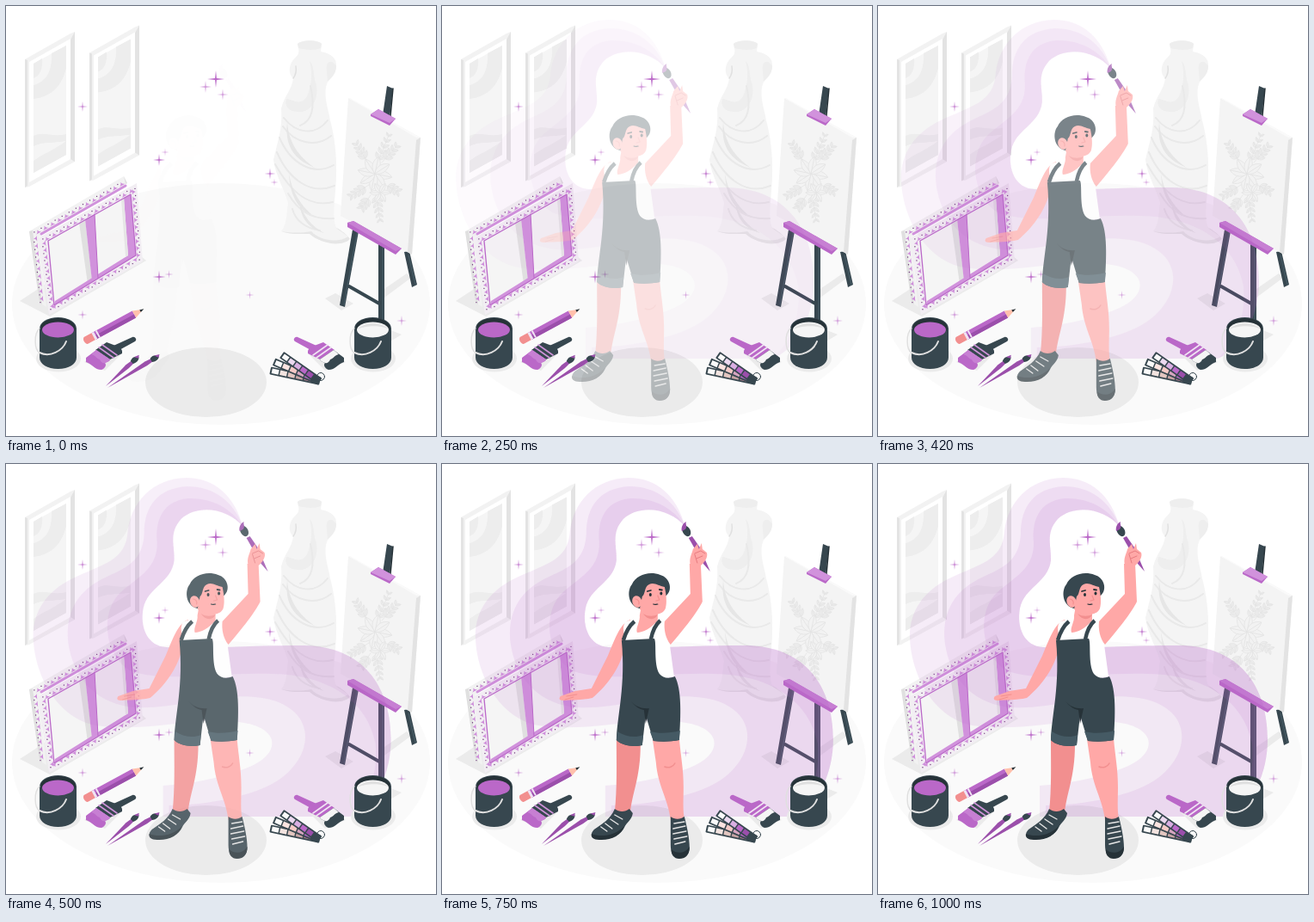
These frames come from a looping animation (500 px wide and 500 px high, 1.04 s). An HTML page:

```html
<!DOCTYPE html>
<html lang="en">
<head>
<meta charset="utf-8">
<title>Painter in the studio</title>
<style>
html, body { margin: 0; width: 100%; height: 100%; overflow: hidden; background: #fff; }
svg { display: block; width: 100%; height: 100%; }
</style>
</head>
<body>
<svg viewBox="0 0 500 500" fill="none" stroke-linecap="round" stroke-linejoin="round">
  <ellipse cx="250" cy="346.500" rx="243" ry="140.500" fill="#fafafa"/>
  <ellipse cx="232.500" cy="437.500" rx="70.500" ry="40.500" fill="#ebebeb"/>

  <defs>
    <g id="picture">
      <path d="M22 62L75 32L80 30V181L27 210L22 211Z" fill="#f2f2f2"/>
      <path d="M22 62L25 63V209L22 211ZM75 39L80 30V181L75 178Z" fill="#e3e3e3"/>
      <path d="M27 65L75 38V178L27 205Z" fill="#fff"/>
      <path d="M32 67L70 46V173L32 194Z" fill="#f5f5f5"/>
      <path d="M53 55L70 46V72C64 98 48 106 32 108V92C46 88 54 77 53 55ZM32 67L42 61C43 72 40 81 32 84ZM32 151C43 145 54 153 70 149V173L32 194V180C43 172 55 168 70 157C55 160 44 157 32 163Z" fill="#ededed"/>
    </g>
    <g id="can">
      <ellipse cx="61" cy="410" rx="26" ry="15.500" fill="#ebebeb"/>
      <path d="M39 375V409C39 416 48 422 60.500 422S82 416 82 409V375Z" fill="#37474f"/>
      <ellipse cx="60.500" cy="375" rx="21.500" ry="13" fill="#37474f"/>
      <ellipse cx="60.500" cy="374" rx="20" ry="11" fill="#263238"/>
      <path d="M39 375C32 381 33 400 39 403" stroke="#e0e0e0" stroke-width="1.500"/>
      <path d="M39 403C51 409 66 401 70 390" stroke="#e0e0e0" stroke-width="2"/>
    </g>
  </defs>
  <use href="#picture"/>
  <use href="#picture" x="75" y="-7.500"/>

  <!-- ornate frames -->
  <path d="M16 343L45 324L151 286L163 296L51 361Z" fill="#ebebeb"/>
  <path d="M27 262L137 198L141 206L38 269L47 350L39 345Z" fill="#f2f2f2"/>
  <path d="M27 262L31 261L42 347L39 345ZM137 198L141 206L139 207Z" fill="#e0e0e0"/>
  <path d="M41 265L139 209" stroke="#d192dc" stroke-width="3"/>
  <path d="M37 270L152 206L159 297L50 359Z" fill="#f2eef3"/>
  <path d="M49 273L145 219L151 290L56 348Z" fill="#f5f5f5"/>
  <path d="M85 252L92 248L100 320L95 323Z" fill="#e0e0e0"/>
  <path d="M92 248L103 242L107 316L100 320Z" fill="#d192dc"/>
  <path d="M137 223L145 219L151 290L56 348L57 343L142 290Z" fill="#d192dc"/>
  <path d="M134 225L137 223L142 290L139 292Z" fill="#e6e6e6"/>
  <path d="M49 273L145 219L151 290L56 348Z" stroke="#ba68c8" stroke-width="1.300"/>
  <path d="M103 242L107 316" stroke="#ba68c8"/>
  <g id="trim"></g>

  <!-- statue -->
  <path d="M320 262C335 254 347 245 358 248C378 251 397 265 400 271C390 281 365 276 353 265C340 265 330 266 320 262Z" fill="#e6e6e6"/>
  <path d="M339 44C345 39 362 39 367 44L366 53C378 55 385 61 384 70C383 79 377 85 374 88C368 102 374 116 377 133C383 155 386 184 383 214C382 232 379 250 385 259L398 268C386 276 365 273 355 262C343 264 333 264 320 262C327 254 326 240 328 229C323 211 314 199 311 179C315 160 322 143 320 119C324 104 333 96 334 84C328 79 329 70 333 64C338 57 343 58 339 44Z" fill="#f4f4f4"/>
  <path d="M339 44C345 39 362 39 367 44L366 49C358 52 348 51 340 49ZM374 88C377 84 384 80 384 70C380 62 371 63 373 75ZM353 64C357 78 355 95 350 105C343 118 330 107 326 108C323 119 332 124 344 123C357 121 365 105 360 89C357 80 359 70 353 64Z" fill="#eee"/>
  <path d="M323 130C337 148 359 152 374 133M322 140C336 160 361 165 378 151M318 153C331 184 358 198 381 185M315 170C328 200 353 221 382 209M313 184C330 215 351 235 380 228M328 218C339 237 354 249 381 247M333 236C337 250 347 258 365 261M354 93C360 119 355 134 342 139" stroke="#e9e9e9" stroke-width="2"/>
  <path d="M327 135C329 164 346 179 359 188C341 181 323 168 327 135ZM329 195C332 215 343 232 356 243C339 237 330 219 329 195ZM341 226C345 244 355 256 370 264C352 259 342 247 341 226Z" fill="#e6e6e6"/>
  <path d="M334 84C337 80 338 76 337 70" stroke="#e0e0e0" stroke-width="1.500"/>

  <!-- easel -->
  <path d="M371 340L383 334L404 346L390 354ZM425 384L440 374L460 382L442 393ZM434 333L466 311L471 316L436 342Z" fill="#ebebeb"/>
  <path d="M443 93L450 96L446 131L438 127Z" fill="#37474f"/>
  <path d="M450 96L447 128" stroke="#263238" stroke-width="1.500"/>
  <path d="M463 286L469 285L478 324L472 327ZM433 277H440V366H433ZM403 260L410 262L394 350L388 348Z" fill="#37474f"/>
  <path d="M468 290L476 324M438 280V366M408 264L393 347" stroke="#455a64" stroke-width="1.200"/>
  <path d="M399 326L434 346" stroke="#37474f" stroke-width="4"/>
  <path d="M398 107L482 153L472 289L389 244Z" fill="#f4f4f4"/>
  <path d="M482 153L477 156L467 286L472 289Z" fill="#e3e3e3"/>
  <path d="M398 107L477 153L482 153L400 107Z" fill="#fafafa"/>
  <g id="sketch" stroke="#e4e4e4" stroke-width=".8"></g>
  <path d="M424 126L433 120L453 131L446 139L424 128Z" fill="#ba68c8"/>
  <path d="M424 126L433 120L453 131L446 136Z" fill="#d192dc"/>
  <path d="M397 252L404 250L460 282L453 289L397 257Z" fill="#ba68c8"/>
  <path d="M397 252L404 250L460 282L453 285Z" fill="#c77fd3"/>

  <g id="sparkles" fill="#ba68c8"></g>

  <!-- painter -->
  <g id="painter">
    <g id="ribbon" fill="#ba68c8" fill-opacity=".125"></g>

    <path d="M201 321C201 350 202 376 199 405L217 406C219 383 229 365 229 326Z" fill="#f28f8f"/>
    <path d="M243 320L274 319C276 342 279 354 279 376C279 389 278 401 280 413L264 414C261 389 249 374 247 347Z" fill="#ffa8a7"/>
    <path d="M257 352C262 354 267 352 269 348" stroke="#f28f8f" stroke-width="1.500"/>

    <path d="M199 401C204 405 211 405 216 401L220 406C219 414 213 416 210 423C206 431 195 437 181 436C171 436 170 430 175 425C185 418 194 413 199 401Z" fill="#37474f"/>
    <path d="M172 430C181 434 200 433 210 421C207 432 194 438 181 437C174 437 171 434 172 430Z" fill="#263238"/>
    <path d="M199 408L208 413M194 413L203 419M188 418L196 424M183 422L190 427" stroke="#e6e6e6" stroke-width="1.400"/>
    <path d="M264 410C269 414 276 413 280 410C283 422 286 435 286 446C286 455 280 459 274 458C267 458 264 452 264 443Z" fill="#37474f"/>
    <path d="M265 448C271 454 281 453 286 445C286 455 281 459 274 459C268 459 264 454 265 448Z" fill="#263238"/>
    <path d="M268 418L280 416M267 424L281 421M267 430L282 427M268 436L283 433M269 442L281 439" stroke="#e6e6e6" stroke-width="1.400"/>

    <path d="M217 181C205 185 198 207 191 223L172 261L153 264L136 270C134 272 134 275 139 275C148 274 160 275 173 272C188 260 204 239 209 219L222 190Z" fill="#ffa8a7"/>
    <path d="M143 270L155 268M141 274L151 271" stroke="#f28f8f"/>
    <path d="M211 184C216 181 223 181 227 181L251 181C259 184 260 201 263 210L268 247L249 251L208 208C213 198 206 193 211 184Z" fill="#fff"/>
    <path d="M257 183L287 151L286 116L299 115L301 160C296 171 279 193 264 210C258 203 256 192 257 183Z" fill="#ffa8a7"/>
    <path d="M230 165L249 173V182C241 191 232 196 225 196C223 190 229 183 228 176Z" fill="#ffa8a7"/>
    <path d="M232 174C238 178 245 177 249 175C247 181 238 183 232 174Z" fill="#f28f8f"/>

    <path d="M207 205L245 203C248 207 244 233 251 244C255 249 262 250 269 247C277 262 276 292 274 321C264 323 253 323 244 322L235 292L231 327C221 329 208 328 201 321C202 291 212 258 207 205Z" fill="#37474f"/>
    <path d="M202 311C211 317 223 319 232 315L231 327C221 329 208 328 201 321ZM240 311C251 314 264 313 275 310L274 321C264 323 253 323 244 322Z" fill="#455a64"/>
    <path d="M218 276C223 282 231 285 239 284L235 302L233 286C227 285 222 281 218 276Z" fill="#263238"/>
    <path d="M209 205C212 195 216 188 222 183M241 204C243 194 246 187 252 182" stroke="#37474f" stroke-width="4.500" stroke-linecap="butt"/>

    <path d="M228 168C214 165 213 147 219 140C224 129 239 124 252 129C263 132 267 146 259 153L234 168Z" fill="#37474f"/>
    <path d="M231 154C235 151 233 143 239 140C245 137 250 142 257 143C259 152 260 161 258 168C254 177 241 176 234 172L228 169Z" fill="#ffa8a7"/>
    <ellipse cx="225" cy="160" rx="5.500" ry="7" transform="rotate(-20 225 160)" fill="#ffa8a7"/>
    <path d="M223 157C226 157 228 160 227 163M249 153L251 158L247 159" stroke="#f28f8f" stroke-width="1.200"/>
    <path d="M237 148L241 147M251 146L254 146.500" stroke="#263238" stroke-width="1.800"/>
    <path d="M244 163C246 164 248 163 249 163" stroke="#263238" stroke-width="1.200"/>
    <ellipse cx="240.500" cy="152" rx="1.500" ry="2" fill="#263238"/>
    <ellipse cx="253" cy="150.500" rx="1.500" ry="2" fill="#263238"/>

    <path d="M285 86L289 84L298 97L310 125L302 116Z" fill="#9b4fab"/>
    <ellipse cx="282.500" cy="78" rx="4.500" ry="6.500" transform="rotate(-28 282.500 78)" fill="#37474f"/>
    <path d="M277 78C276 74 278 69 282 67C281 71 284 72 281 76Z" fill="#9b4fab"/>
    <path d="M287 117C285 110 289 104 290 99L295 93L297 99L300 92L301 99L306 103C308 108 303 115 299 118Z" fill="#ffa8a7"/>
    <path d="M292 104L299 101L304 104M294 110L301 107M292 105L295 115" stroke="#e77c80"/>
  </g>

  <!-- tools on the floor -->
  <use href="#can"/>
  <ellipse cx="60.500" cy="376.500" rx="18.500" ry="9" fill="#ba68c8"/>
  <use href="#can" x="366"/>
  <ellipse cx="426.500" cy="376.500" rx="18.500" ry="9" fill="#f5f5f5"/>
  <path d="M409 376C415 367 438 367 445 376C438 371 418 371 409 376Z" fill="#e0e0e0"/>

  <g transform="translate(91 390) rotate(-28.500)">
    <path d="M2 -4.500H13V4.500H2C-1 3 -1 -3 2 -4.500Z" fill="#f28f8f"/>
    <path d="M13 -4.500H66V4.500H13Z" fill="#ba68c8"/>
    <path d="M13 0H66V4.500H13Z" fill="#9b4fab"/>
    <path d="M12 -4.500H15V4.500H12ZM17 -4.500H19V4.500H17Z" fill="#f0e4f3"/>
    <path d="M66 -4.500L78 0L66 4.500Z" fill="#ffc0ac"/>
    <path d="M74 -1.500L79 0L74 1.500Z" fill="#263238"/>
  </g>
  <g id="brushes"></g>
  <g id="swatches"></g>
  <circle cx="366" cy="431" r="4.500" stroke="#37474f"/>
</svg>
<script>
const LOOP = 1040, FRAME = 1000 / 24;
const byId = id => document.getElementById(id);
const add = (id, markup) => { byId(id).innerHTML += markup; };

// Three bands share the edge next to the painter
const sharedEdge = 'C437 397 453 358 453 320C453 258 420 212 352 211C288 210 234 216 192 213C170 212 161 190 165 168C170 143 198 138 201 112C202 95 194 81 209 64C229 46 264 52 281 73Z';
[
  'C271 36 247 16 215 16C175 17 151 45 147 78C145 113 118 116 81 134C53 148 37 171 37 200C38 248 67 296 110 304C167 313 224 293 276 300C327 306 326 339 284 354C253 366 219 372 188 374V410H405',
  'C270 43 247 26 216 26C181 28 166 50 166 81C164 124 129 123 104 142C82 158 73 184 79 215C87 254 115 280 155 283C204 286 251 264 303 272C365 282 366 334 327 364C299 386 238 397 195 397V410H405',
  'C267 50 243 39 217 40C187 43 179 66 181 90C183 127 148 135 132 157C116 181 122 223 149 240C186 255 252 242 314 244C382 245 426 277 435 325C438 358 429 388 405 410'
].forEach(edge => add('ribbon', `<path d="M281 73${edge}${sharedEdge}"/>`));

// Scalloped ornament from (x1,y1) to (x2,y2)
function trim(x1, y1, x2, y2, count) {
  const angle = Math.atan2(y2 - y1, x2 - x1) * 180 / Math.PI;
  const step = Math.hypot(x2 - x1, y2 - y1) / count;
  let parts = '';
  for (let i = 0; i < count; i++) {
    const x = (i + .5) * step;
    parts += `<path d="M${x - step * .4} 2.500Q${x - 1} 2 ${x} -1.500Q${x + 1} 2 ${x + step * .4} 2.500Z" fill="#ce8cda"/>` +
      `<circle cx="${x - step * .45}" cy="-1" r=".7" fill="#6f3b7a"/>`;
  }
  add('trim', `<g transform="translate(${x1} ${y1}) rotate(${angle})">${parts}</g>`);
}
trim(33, 264, 138, 204, 13);
trim(41, 345, 33, 266, 9);
trim(43, 272, 149, 212, 13);
trim(149, 212, 155, 294, 10);
trim(155, 294, 53, 353, 13);
trim(53, 353, 43, 272, 10);

function leaf(x, y, angle, length, fill = 'none') {
  add('sketch', `<path transform="translate(${x} ${y}) rotate(${angle})" fill="${fill}"
    d="M0 0C${length * .3} ${-length * .4} ${length * .8} ${-length * .25} ${length} 0C${length * .7} ${length * .25} ${length * .3} ${length * .3} 0 0H${length}"/>`);
}
function sprig(x, y, angle, length, count) {
  const a = angle * Math.PI / 180;
  add('sketch', `<path d="M${x} ${y}l${length * Math.cos(a)} ${length * Math.sin(a)}"/>`);
  for (let i = 1; i <= count; i++) {
    const d = length * i / count;
    for (const turn of [-42, 42]) {
      leaf(x + d * Math.cos(a), y + d * Math.sin(a), angle + turn, 10 - i, '#efefef');
    }
  }
}
sprig(431, 185, -68, 36, 5);
sprig(437, 182, -48, 24, 4);
sprig(421, 182, -122, 24, 4);
sprig(422, 208, 148, 23, 4);
sprig(439, 207, 28, 17, 3);
sprig(430, 215, 82, 33, 5);
sprig(424, 220, 125, 16, 3);
for (let i = 0; i < 8; i++) leaf(429, 195, i * 45 + 12, 20, '#f2f2f2');
for (let i = 0; i < 6; i++) leaf(435, 217, i * 60, 12, '#f2f2f2');

function sparkle(x, y, r, opacity) {
  const w = r * .09;
  add('sparkles', `<path transform="translate(${x} ${y})" opacity="${opacity}"
    d="M0 ${-r}L${w} ${-w}L${r} 0L${w} ${w}L0 ${r}L${-w} ${w}L${-r} 0L${-w} ${-w}Z"/>`);
}
[[244, 85, 10, 1], [232, 94, 7, .7], [252, 103, 6.5, .75], [89, 117, 6, .9],
 [178, 179, 7, 1], [185, 170, 4.5, .6], [307, 195, 6.5, 1], [312, 205, 4.5, .65],
 [178, 315, 7.5, 1], [189.5, 312, 5, .65], [283.5, 336, 5, .6], [89, 359, 5.5, .8],
 [460, 366, 6, .75]].forEach(s => sparkle(...s));

function wideBrush(transform, handle, ferrule, stripe, bristles, shine) {
  add('brushes', `<g transform="${transform}">
    <path d="M351 404L371 424L395 414L382 405Z" fill="#ebebeb"/>
    <path d="M339 385L361 395L356 401L336 390C333 388 336 384 339 385Z" fill="${handle}"/>
    <path d="M351 401L353 397L369 391L382 400L365 411L351 404Z" fill="${ferrule}"/>
    <path d="M357 406L374 394M361 409L378 397" stroke="${stripe}" stroke-width="1.600"/>
    <path d="M381 400L393 409V414C386 416 383 423 375 423C370 421 369 417 371 415C367 414 365 412 365 411Z" fill="${bristles}"/>
    <path d="M381 400L387 405C382 406 381 410 377 411C376 414 373 416 371 415C367 414 365 412 365 411Z" fill="${shine}"/></g>`);
}
wideBrush('', '#ba68c8', '#ba68c8', '#f0e4f3', '#37474f', '#f5f5f5');
wideBrush('translate(486 0) scale(-1 1)', '#37474f', '#37474f', '#ce93d8', '#ba68c8', '#c77fd3');

function fineBrush(x, y, angle, length) {
  add('brushes', `<g transform="translate(${x} ${y}) rotate(${angle})">
    <path d="M0 0L${length - 14} -2.800L${length - 6} -2V2L${length - 14} 2.500Z" fill="#9b4fab"/>
    <path d="M${length - 7} -2.500C${length - 2} -5 ${length + 2} -2 ${length + 3} 1C${length} 4 ${length - 4} 3.500 ${length - 7} 2Z" fill="#37474f"/>
    <path d="M${length - 1} -3L${length + 5} -1L${length + 2} 1.500Z" fill="#9b4fab"/></g>`);
}
fineBrush(116, 442, -42, 48);
fineBrush(118, 444, -32, 67);

function swatch(angle, length, colors) {
  const gap = (length - 10) / colors.length;
  const chips = colors.map((color, i) =>
    `<rect x="${2 - length + i * gap}" y="-2.800" width="${gap - 1.500}" height="5.600" fill="${color}"/>`).join('');
  add('swatches', `<g transform="translate(364 436) rotate(${angle})">
    <rect x="${-length}" y="-4.500" width="${length + 1}" height="9" rx="1" fill="#37474f"/>${chips}</g>`);
}
swatch(12, 58, ['#fafafa', '#f3e4e0', '#e3c6c0', '#c9a5a5', '#a87d8b']);
swatch(23, 57, ['#fafafa', '#fbe3e0', '#f5c9c6', '#d6a5c0', '#ba68c8']);
swatch(35, 53, ['#fafafa', '#ecd9f0', '#d9aee2', '#ba68c8', '#9b4fab']);

// cubic-bezier(.36, -.01, .5, 1.38)
function ease(x) {
  if (x >= 1) return 1;
  const curve = (a, b, s) => 3 * (1 - s) ** 2 * s * a + 3 * (1 - s) * s * s * b + s ** 3;
  let low = 0, high = 1;
  for (let i = 0; i < 24; i++) {
    const mid = (low + high) / 2;
    if (curve(.36, .5, mid) < x) low = mid; else high = mid;
  }
  return curve(-.01, 1.38, low);
}

const painter = byId('painter');
function render(time) {
  const step = Math.floor((time % LOOP + 3) / FRAME);
  const p = ease((step + 1) / 24);
  painter.setAttribute('transform', `translate(${30 * (p - 1)} 0)`);
  painter.setAttribute('opacity', Math.max(0, Math.min(1, p)));
}

const start = performance.now();
function tick() {
  render(performance.now() - start);
  requestAnimationFrame(tick);
}
tick();
</script>
</body>
</html>
```
